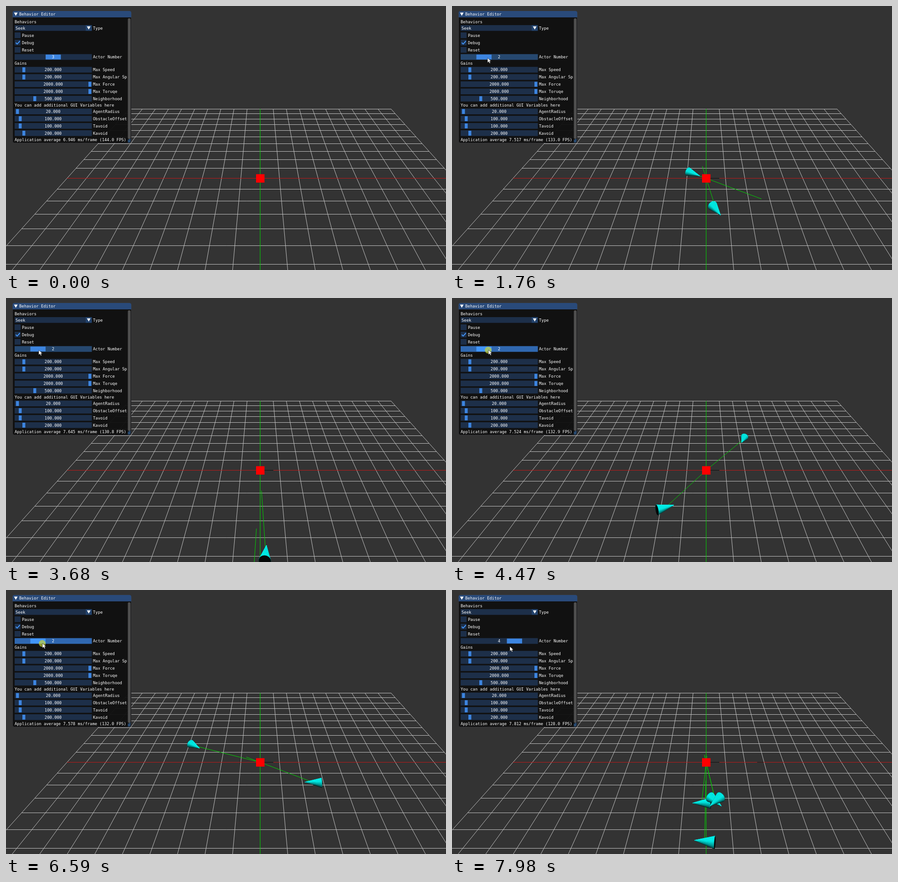
An HTML page with a canvas for the animation above (8 s loop, 966 by 580 pixels).

```html
<!DOCTYPE html>
<html lang="en">
<head>
<meta charset="utf-8">
<title>Behavior Editor</title>
<style>
  html, body { margin: 0; width: 100%; height: 100%; overflow: hidden; background: #333; }
  canvas, svg { position: absolute; left: 0; top: 0; }
  text { font: 8.86px "DejaVu Sans Mono", monospace; fill: #fff; white-space: pre; }
  .mid { text-anchor: middle; }
  .field { fill: #1d2f49; }
  .grab { fill: #3d85e0; }
</style>
</head>
<body>
<canvas id="scene" width="966" height="580"></canvas>
<svg id="panel" width="966" height="580" viewBox="0 0 966 580">
  <rect x="14.5" y="11" width="260.5" height="290" rx="4" fill="#0f0f0f" fill-opacity=".95" stroke="#44444a" stroke-width=".6"/>
  <path d="M14.5 25V15q0-4 4-4H271q4 0 4 4V25Z" fill="#294a7a"/>
  <path d="M17.5 14.5h8l-4 7Z" fill="#fff"/>
  <rect x="267.5" y="27" width="6" height="265" rx="3" fill="#4f4f4f"/>
  <path d="M273.5 291v6q0 3-3 3h-3v-6Z" fill="#294a70"/>
  <rect class="field" x="19" y="42" width="156" height="12.6"/>
  <rect x="175" y="42" width="13.5" height="12.6" fill="#23436d"/>
  <path d="M177.6 44.8h8l-4 7Z" fill="#fff"/>
</svg>
<script>
const LOOP = 8000;
const panel = document.getElementById('panel');
const ctx = document.getElementById('scene').getContext('2d');

function add(tag, attrs, content = '') {
  const el = document.createElementNS('http://www.w3.org/2000/svg', tag);
  for (const key in attrs) el.setAttribute(key, attrs[key]);
  el.textContent = content;
  return panel.appendChild(el);
}
const label = (x, y, str) => add('text', { x, y: y + 3.2 }, str);
const box = (cls, x, y, width) => add('rect', { class: cls, x, y: y - 6.3, width, height: 12.6 });

function slider(y, name, value, grabX, grabWidth = 6.4) {
  const field = box('field', 19, y, 169.5);
  const grab = add('rect', { class: 'grab', x: grabX, y: y - 5.3, width: grabWidth, height: 10.8 });
  const text = add('text', { class: 'mid', x: 103.5, y: y + 3.2 }, value);
  label(191, y, name);
  return { field, grab, text };
}

label(29, 18, 'Behavior Editor');
label(19, 35, 'Behaviors');
label(21, 48.5, 'Seek');
label(191, 48.5, 'Type');
['Pause', 'Debug', 'Reset'].forEach((name, i) => {
  box('field', 19, 64.3 + i * 16, 13);
  label(35, 64.3 + i * 16, name);
});
add('path', { d: 'M21.5 80.5l3 3.2 6-6.7', fill: 'none', stroke: '#4296fa', 'stroke-width': 1.9 });
const actors = slider(112, 'Actor Number', '3', 87, 33.4);
label(19, 126, 'Gains');
slider(140, 'Max Speed', '200.000', 36);
slider(156, 'Max Angular Sp', '200.000', 36);
slider(171.8, 'Max Force', '2000.000', 181);
slider(187.7, 'Max Toruqe', '2000.000', 181);
slider(203.5, 'Neighborhood', '500.000', 60);
label(19, 217.5, 'You can add additional GUI Variables here');
slider(231.7, 'AgentRadius', '20.000', 22);
slider(247.5, 'ObstacleOffset', '100.000', 28);
slider(263.4, 'Tavoid', '100.000', 28);
slider(279.3, 'Kavoid', '200.000', 36);
const stats = label(19, 293.7, '');
const ripple = add('circle', { r: 7.5, fill: '#c4d03c', 'fill-opacity': .72 });
const pointer = add('path', { d: 'M0 0V10.5L2.6 8.2 4.4 12 6.3 11.2 4.6 7.5H8Z', fill: '#fff', stroke: '#111', 'stroke-width': .6 });

const pointerPath = [[70, 210, 190], [450, 104, 114], [1000, 78, 114], [2560, 78, 114], [2850, 64, 115],
  [3300, 66, 115], [4200, 80, 114], [4700, 80, 114], [5020, 22, 114], [5790, 25, 114],
  [6450, 80, 117], [6680, 80, 117], [6960, 132, 114], [7250, 132, 114], [7750, 127, 124]];
const frameCost = [[0, 6.946], [1760, 7.517], [2950, 7.757], [4470, 7.524], [5790, 7.406], [6590, 7.578], [7980, 7.812]];
const presses = [[930, 1130], [2850, 3060], [4340, 4560], [5030, 5300], [6480, 6690], [6970, 7150]];

// x, z and heading at a reference time, then their rates per second and the bend of z.
const agent = (x, z, heading, vx, vz, spin, bend = 0) =>
  s => [x + vx * s, z + vz * s + bend * s * s, heading + spin * s];

const runs = [{ from: 0, count: 3, agents: [] }];
const run = (from, count, reference, ...agents) => runs.push({ from, count, reference, agents });
run(70, 3, 70,
  agent(5.6, 3, 210, -3.2, -1.8, -4),
  agent(-3.4, 1.2, -20, 3.4, -1.2, 0),
  agent(1, -4.5, 100, -.9, 3.8, 0));
run(1000, 2, 1760,
  agent(-.66, -.47, 35, .45, 6.5, 125, -1.68),
  agent(.46, 2.7, 64, -.39, 6.5, 101, -1.82));
run(4360, 2, 4470,
  agent(-1.8, 3.1, -25, 2, -3.4, -30),
  agent(2.24, -3.5, 108, -2.4, 3.7, 16));
run(5060, 1, 5790,
  agent(-.14, 2.77, 8, .5, 3, -60, -3));
run(6510, 2, 6590,
  agent(-3.67, -1.74, 41, 3.1, 1.4, -12),
  agent(2.52, 1.8, 184, -3.5, -2.5, 30));
run(7000, 4, 7980,
  agent(-.2, 3.34, 180, 2, 4.6, 150),
  agent(.41, 3.22, 53, 2, 5.5, 0),
  agent(.41, 3.22, 127, -1.4, 4.8, 0),
  agent(-.06, 5.63, 188, -.7, 7.5, 80));

function sample(path, t) {
  const next = path.findIndex(p => p[0] > t);
  if (next === 0) return path[0].slice(1);
  if (next < 0) return path[path.length - 1].slice(1);
  const a = path[next - 1], b = path[next], u = (t - a[0]) / (b[0] - a[0]);
  return a.slice(1).map((v, i) => v + (b[i + 1] - v) * u);
}

// Ground plane perspective; one unit is one grid cell.
function project(x, y, z) {
  const w = .0021182 - .00010107 * z, scale = .08981 / w;
  return [558 + x * scale, 1 / w - 93.6 - y * scale * .85];
}

function line(a, b, color) {
  ctx.strokeStyle = color;
  ctx.lineWidth = 1;
  ctx.beginPath();
  ctx.moveTo(...a);
  ctx.lineTo(...b);
  ctx.stroke();
}

function polygon(points, color) {
  ctx.fillStyle = ctx.strokeStyle = color;
  ctx.lineWidth = .5;
  ctx.beginPath();
  points.forEach(p => ctx.lineTo(...p));
  ctx.closePath();
  ctx.fill();
  ctx.stroke();
}

function row(z, color) {
  const y = Math.floor(project(0, 0, z)[1]) + .5;
  line([project(-10, 0, z)[0], y], [project(10, 0, z)[0], y], color);
}

function drawGrid() {
  ctx.fillStyle = '#333';
  ctx.fillRect(0, 0, 966, 580);
  for (let i = -10; i <= 10; i++) {
    if (!i) continue;
    line(project(i, 0, -10), project(i, 0, 10), '#c4c4c4');
    row(i, '#c4c4c4');
  }
  row(0, '#c01818');
  line([558, 226], [558, 580], '#00e000');
}

function drawCone([x, z, heading]) {
  const LENGTH = .78, RADIUS = .22, SIDES = 28;
  const a = heading * Math.PI / 180, dx = Math.cos(a), dz = Math.sin(a);
  const rim = i => {
    const phi = i / SIDES * 2 * Math.PI, side = Math.cos(phi), up = Math.sin(phi);
    return {
      up,
      facing: side * dx * .86 + up * .5,
      at: project(x - dx * LENGTH / 2 - dz * side * RADIUS, up * RADIUS, z - dz * LENGTH / 2 + dx * side * RADIUS)
    };
  };
  const apex = project(x + dx * LENGTH / 2, 0, z + dz * LENGTH / 2);
  const ring = Array.from({ length: SIDES }, (_, i) => rim(i));
  const base = () => polygon(ring.map(p => p.at), '#050808');
  const baseVisible = dz < x * dx / 20;
  if (!baseVisible) base();
  ring.map((p, i) => ({ ...p, next: ring[(i + 1) % SIDES].at }))
    .sort((p, q) => p.facing - q.facing)
    .forEach(p => {
      const light = Math.max(0, Math.min(1, .6 + .1 * dx + .6 * p.up));
      polygon([apex, p.at, p.next], `rgb(0,${light * 238},${light * 232})`);
    });
  if (baseVisible) base();
}

function drawScene(poses) {
  drawGrid();
  if (poses.length) line([567, 378.5], [587, 378.5], '#101010');
  if (poses.length > 3) line([670, 378.5], [684, 378.5], '#401010');
  for (const [x, z] of poses) {
    const rest = 1 - 4 / (Math.hypot(x, z) || 1);
    line(project(x, 0, z), project(x * rest, 0, z * rest), '#00d800');
  }
  ctx.fillStyle = '#f00';
  ctx.fillRect(549, 369.5, 18.5, 18.5);
  poses.forEach(drawCone);
}

function drawPanel(t, count) {
  const pressed = presses.some(([from, to]) => t >= from && t < to);
  const hovered = t > 450 && t < 7500;
  const [x, y] = sample(pointerPath, t);
  const [cost] = sample(frameCost, t);
  actors.field.style.fill = pressed ? '#3068b0' : hovered ? '#26486f' : '#1d2f49';
  actors.grab.style.fill = pressed ? '#4296fa' : '#3d85e0';
  actors.grab.setAttribute('x', 20 + (count - 1) * 33.5);
  actors.text.textContent = count;
  stats.textContent = `Application average ${cost.toFixed(3)} ms/frame (${(1000 / cost).toFixed(1)} FPS)`;
  pointer.setAttribute('transform', `translate(${x} ${y})`);
  pointer.style.display = t < 70 ? 'none' : '';
  ripple.setAttribute('cx', x - .5);
  ripple.setAttribute('cy', y + .5);
  ripple.style.display = pressed ? '' : 'none';
}

const start = performance.now();
function tick() {
  const t = (performance.now() - start) % LOOP;
  const { count, reference, agents } = runs.filter(r => r.from <= t).pop();
  drawScene(agents.map(pose => pose((t - reference) / 1000)));
  drawPanel(t, count);
  requestAnimationFrame(tick);
}
tick();
</script>
</body>
</html>
```
